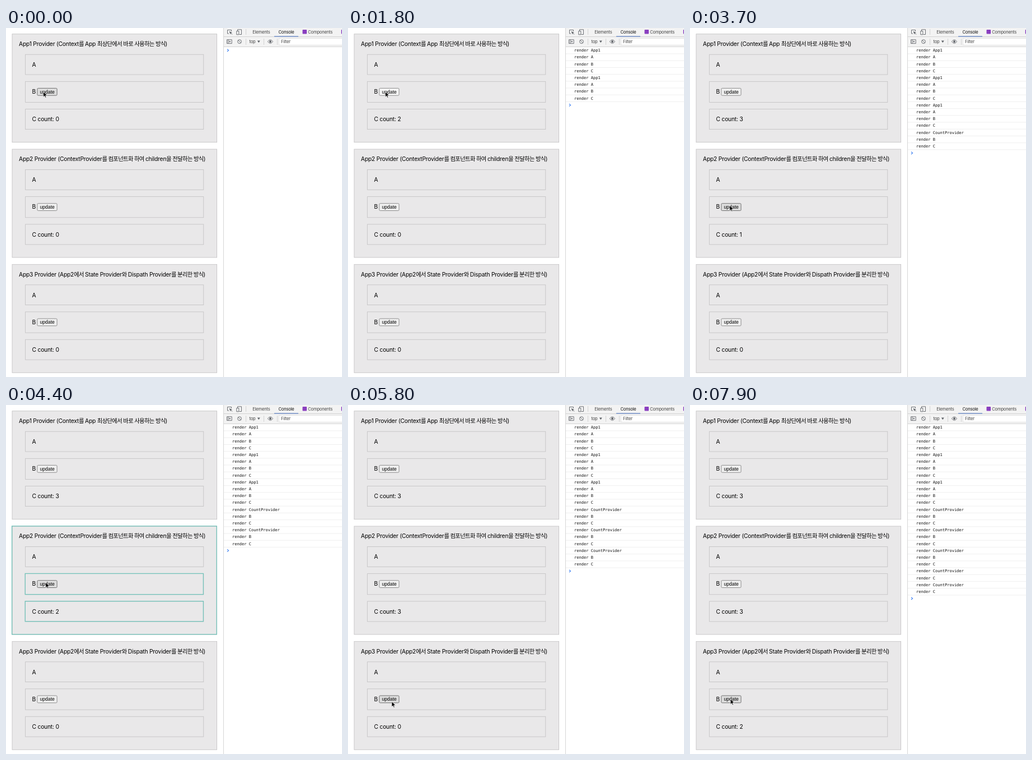
Write an HTML page that moves like this. It is 600 by 622 pixels and loops after 8000 ms.

```html
<!DOCTYPE html>
<html lang="ko">
<head>
<meta charset="utf-8">
<style>
html, body { margin: 0; width: 100%; height: 100%; overflow: hidden; background: #fff; }
svg { display: block; }
text { white-space: pre; }
.page { font: 10.3px Inter, "Noto Sans CJK KR", "Noto Sans CJK", sans-serif; letter-spacing: -.22px; fill: #000; }
.ko { letter-spacing: -.63px; }
.box { fill: #e9e8e9; stroke: #c0bfc0; stroke-width: .8; }
.hot { fill: none; stroke: #72c2b9; stroke-width: 1.3; }
.btn { stroke-width: .8; }
.btn-label { font: 8.67px "Liberation Sans", Arial, sans-serif; letter-spacing: 0; fill: #000; }
.ui { font: 7.6px Inter, sans-serif; letter-spacing: -.18px; fill: #444; }
.log { font: 7.06px "DejaVu Sans Mono", monospace; fill: #111; }
.icon { fill: none; stroke: #5f6368; stroke-width: .9; }
.solid { fill: #5f6368; stroke: none; }
.line { stroke: #cbcbcb; stroke-width: .8; }
.row .line { stroke: #ebebeb; }
</style>
</head>
<body>
<svg id="stage" width="600" height="622" viewBox="0 0 600 622"></svg>
<script>
const LOOP = 8000, STEP = 100, PITCH = 205.3, ROW = 12.2;

// delays after a press
const RENDER = 130, GLOW_ON = 190, GLOW_OFF = 390;

// Odd title parts are Korean. P is the panel itself, A to C its children.
const apps = [
  { title: ["App1 Provider (Context", "를 ", "App ", "최상단에서 바로 사용하는 방식", ")"],
    renders: ["App1", "A", "B", "C"], lit: "PABC", first: 20, gap: 890, clicks: 3 },
  { title: ["App2 Provider (ContextProvider", "를 컴포넌트화 하여 ", "children", "을 전달하는 방식", ")"],
    renders: ["CountProvider", "B", "C"], lit: "PBC", first: 3310, gap: 845, clicks: 3 },
  { title: ["App3 Provider (App2", "에서 ", "State Provider", "와 ", "Dispath Provider", "를 분리한 방식", ")"],
    renders: ["CountProvider", "C"], lit: "PC", first: 6660, gap: 845, clicks: 2 }
];
for (const app of apps)
  app.presses = Array.from({ length: app.clicks }, (_, k) => app.first + k * app.gap);

const home = { x: 66.7, y: 113.5 };
const moves = [
  { from: 2150, to: 2900, x: 67, y: 302 },
  { from: 2900, to: 3030, x: 70.8, y: 316.3 },
  { from: 5500, to: 5850, x: 78.5, y: 541 },
  { from: 5950, to: 6650, x: 72.2, y: 524 }
];

const rect = (x, y, w, h, attrs) => `<rect x="${x}" y="${y}" width="${w}" height="${h}" ${attrs}/>`;
const text = (x, y, cls, body, attrs = "") => `<text x="${x}" y="${y}" class="${cls}" ${attrs}>${body}</text>`;
const hline = y => `<path class="line" d="M389 ${y}H600"/>`;
const vline = (x, y1, y2) => `<path class="line" d="M${x} ${y1}V${y2}"/>`;

const child = (y, h) => [34.6, y, 318.2, h];
const boxes = { P: [11, 10.7, 365.6, 193], A: child(47.2, 35.8), B: child(95.3, 37.2), C: child(144.6, 36) };

function panel(app, i) {
  const title = app.title.map((s, k) => k % 2 ? `<tspan class="ko">${s}</tspan>` : s).join("");
  const frames = Object.values(boxes).map(b => rect(...b, 'class="box"')).join("");
  const glow = [...app.lit].map(k => rect(...boxes[k], 'class="hot"')).join("");
  return `<g transform="translate(0 ${i * PITCH})">${frames}
    ${text(23, 32.2, "page", title)}${text(46.5, 69, "page", "A")}${text(46.5, 117.2, "page", "B")}
    ${rect(55.9, 107.4, 35.2, 12.8, `rx="1.6" class="btn" id="btn${i}"`)}
    ${text(60.4, 116.7, "btn-label", "update")}
    ${text(46.5, 166.4, "page", "C count: 0", `id="count${i}"`)}
    <g id="glow${i}" transform="translate(-.4 -.2)">${glow}</g></g>`;
}

function toolbar() {
  const badge = x => rect(x, 3, 7.6, 7.6, 'rx="1" fill="#8a3fc0"');
  return rect(389, 0, 211, 33.5, 'fill="#f3f3f3"') + hline(15.5) + hline(33.5) +
    vline(428.5, 2, 12) + [428.5, 460.5, 484.5].map(x => vline(x, 19, 30)).join("") +
    `<g class="icon">
      <path d="M398 10H395.5V3.5H402.5V6M401.5 9L404 11.6"/>
      <path class="solid" d="M398.5 5.8L404 8.2 401.6 8.9 400.9 11.4Z"/>
      <path d="M413.5 5V2.8H420.5V11.5H416.5M411.8 5.5H415.8V11.8H411.8Z"/>
      <path d="M394.5 20.8H403.2V27.6H394.5ZM396.8 20.8V27.6"/>
      <path class="solid" d="M398.6 22.6L401.5 24.2 398.6 25.8Z"/>
      <circle cx="417" cy="24.2" r="3.4"/><path d="M414.6 21.8L419.4 26.6"/>
      <path d="M467.3 24.2Q472 18 476.7 24.2Q472 30.4 467.3 24.2Z"/><circle cx="472" cy="24.2" r="1.5" fill="#5f6368"/>
      <path class="solid" d="M448.8 22.4H453.8L451.3 26.2Z"/>
    </g>` +
    text(440.2, 9.8, "ui", "Elements") + text(486.4, 9.8, "ui", "Console", 'style="fill:#111"') +
    rect(479, 14.4, 43, 1.2, 'fill="#5a7fc4"') +
    badge(529.5) + text(539.2, 9.8, "ui", "Components") + badge(598.7) +
    text(434.5, 27, "ui", "top") +
    rect(487.5, 18.5, 120, 12, 'fill="#fff" stroke="#ddd" stroke-width=".8"') + text(491, 27, "ui", "Filter");
}

const logs = apps.flatMap(app => app.presses.flatMap(() => app.renders));
const logRow = (name, i) => `<g class="row" transform="translate(0 ${i * ROW})">
  ${text(404, 42.3, "log", "render " + name)}${hline(46)}</g>`;

document.getElementById("stage").innerHTML = apps.map(panel).join("") +
  vline(388.5, 0, 622) + toolbar() + logs.map(logRow).join("") +
  `<path id="prompt" d="M395 37.6L397.5 39.8 395 42" fill="none" stroke="#367cf1" stroke-width="1.1"/>
   <path id="pointer" d="M0 0V9.4L2.2 7.4 3.7 10.8 5.2 10.1 3.8 6.8 6.8 6.6Z" fill="#000" stroke="#fff" stroke-width=".7"/>`;

const el = id => document.getElementById(id);
const rows = [...document.querySelectorAll(".row")];
const show = (node, on) => node.setAttribute("visibility", on ? "visible" : "hidden");
const place = (node, x, y) => node.setAttribute("transform", `translate(${x} ${y})`);

function pointerAt(t) {
  let { x, y } = home;
  for (const m of moves) {
    const f = Math.min(1, Math.max(0, (t - m.from) / (m.to - m.from)));
    const e = f * f * (3 - 2 * f);
    x += (m.x - x) * e;
    y += (m.y - y) * e;
  }
  return { x, y };
}

function draw(now) {
  const t = Math.floor(now % LOOP / STEP) * STEP;
  const tip = pointerAt(t);
  let shown = 0;

  apps.forEach((app, i) => {
    const within = (a, b) => app.presses.some(p => t >= p + a && t < p + b);
    const count = app.presses.filter(p => t >= p + RENDER).length;
    const down = within(0, RENDER);
    const y = tip.y - i * PITCH;
    const hover = !down && tip.x > 55 && tip.x < 92 && y > 107 && y < 120.5;
    const btn = el("btn" + i);
    btn.style.fill = down ? "#f5f5f5" : hover ? "#dddddd" : "#efefef";
    btn.style.stroke = hover ? "#555" : "#767676";
    el("count" + i).textContent = "C count: " + count;
    show(el("glow" + i), within(GLOW_ON, GLOW_OFF));
    shown += count * app.renders.length;
  });

  rows.forEach((row, i) => show(row, i < shown));
  place(el("prompt"), 0, shown * ROW);
  place(el("pointer"), tip.x, tip.y);
}

const start = performance.now();
function tick() {
  draw(performance.now() - start);
  requestAnimationFrame(tick);
}
tick();
</script>
</body>
</html>
```
